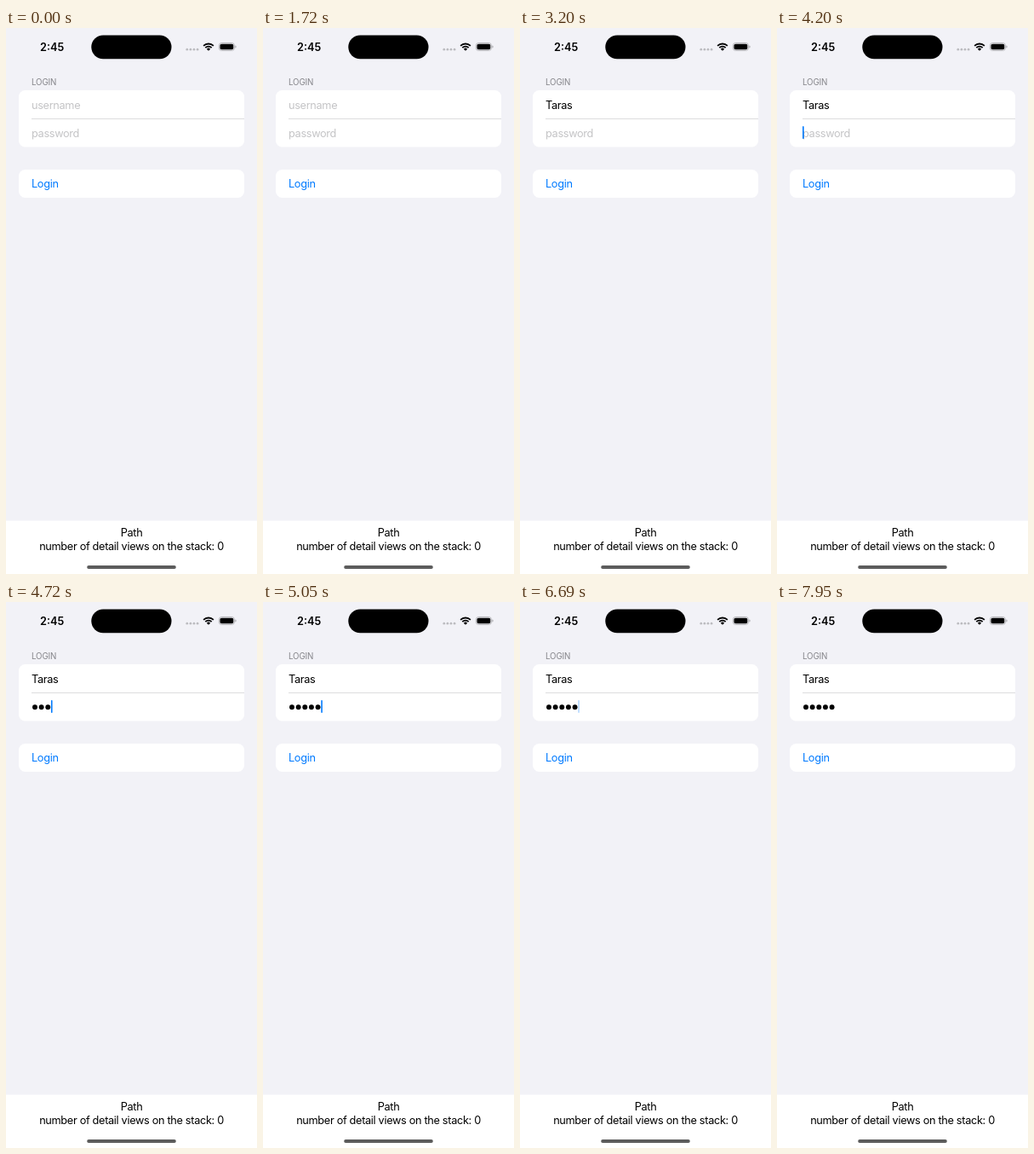
Animation, 295 px wide and 640 px high, one loop 8 s. Source, as an HTML page with a canvas:

```html
<!DOCTYPE html>
<html lang="en">
<head>
<meta charset="utf-8">
<title>Login form</title>
<style>
  html, body { margin: 0; width: 100%; height: 100%; overflow: hidden; background: #f2f2f7; }
  canvas { display: block; width: 295px; height: 640px; }
</style>
</head>
<body>
<canvas id="stage"></canvas>
<script>
const W = 295, H = 640, LOOP = 8000;
const BLUE = '#007aff', HINT = '#c4c4c6', LEFT = 30;
const NAME = 'Taras', BULLET = 7.65;

const canvas = document.getElementById('stage');
const ctx = canvas.getContext('2d');
const ratio = window.devicePixelRatio || 1;
canvas.width = W * ratio;
canvas.height = H * ratio;
ctx.scale(ratio, ratio);

// Each step: [start time, value], held until the next one.
const nameKeys = [[0, 0], [1830, 1], [2120, 2], [2260, 3], [2440, 5]];
const passKeys = [[0, 0], [4420, 1], [4720, 3], [4850, 4], [5050, 5]];
const nameCaret = [[0, 0], [1370, .7], [1480, .3], [1720, 0], [1830, 1],
  [2940, .65], [3060, .3], [3200, 0]];
const passCaret = [[0, 0], [3730, .7], [3870, .3], [4080, 0], [4200, 1],
  [5550, .65], [5670, .3], [5920, 0], [6030, 1],
  [6570, .65], [6690, .3], [6930, 0], [7050, 1],
  [7590, .65], [7710, .3], [7950, 0]];

function valueAt(steps, t) {
  let value = steps[0][1];
  for (const [start, v] of steps) if (t >= start) value = v;
  return value;
}

function pill(x, y, w, h, r, color) {
  ctx.fillStyle = color;
  ctx.beginPath();
  ctx.roundRect(x, y, w, h, r);
  ctx.fill();
}

function dot(x, y, r, color) {
  ctx.fillStyle = color;
  ctx.beginPath();
  ctx.arc(x, y, r, 0, 2 * Math.PI);
  ctx.fill();
}

function setFont(size = 12.75, tracking = -.34, weight = 400) {
  ctx.font = `${weight} ${size}px Inter, sans-serif`;
  ctx.letterSpacing = tracking + 'px';
}

function label(text, x, y, color = '#000') {
  ctx.fillStyle = color;
  ctx.fillText(text, x, y);
}

function centered(text, y) {
  label(text, W / 2 - ctx.measureText(text).width / 2, y);
}

function caret(x, y, alpha) {
  ctx.globalAlpha = alpha;
  pill(x, y, 1.6, 15, .8, BLUE);
  ctx.globalAlpha = 1;
}

function wifi(x, y) {
  const from = -Math.PI * .75, to = -Math.PI * .25;
  ctx.strokeStyle = ctx.fillStyle = '#000';
  ctx.lineWidth = 1.8;
  for (const r of [5.2, 8.3]) {
    ctx.beginPath();
    ctx.arc(x, y, r, from, to);
    ctx.stroke();
  }
  ctx.beginPath();
  ctx.moveTo(x, y);
  ctx.arc(x, y, 3, from, to);
  ctx.fill();
}

function battery(x, y) {
  ctx.strokeStyle = '#a4a4a8';
  ctx.lineWidth = .8;
  ctx.beginPath();
  ctx.roundRect(x + .4, y + .4, 18, 8.8, 2.9);
  ctx.stroke();
  pill(x + 1.5, y + 1.5, 15.8, 6.6, 1.8, '#000');
  pill(x + 19.4, y + 3.3, 1.1, 3, [0, 1, 1, 0], '#a4a4a8');
}

function statusBar() {
  setFont(12.7, 0, 600);
  label('2:45', 40, 26.5);
  pill(100.3, 8.4, 94.2, 27.8, 13.9, '#000');
  for (let i = 0; i < 4; i++) dot(212.8 + i * 4.1, 25.2, 1.35, '#bcbcc0');
  wifi(238, 26.8);
  battery(250, 17.2);
}

function form(t) {
  setFont(9.75, -.15);
  label('LOGIN', LEFT, 66.5, '#85858a');
  pill(15, 73, 265, 66.5, 7.5, '#fff');
  pill(15, 166, 265, 33, 7.5, '#fff');
  ctx.fillStyle = '#dcdcde';
  ctx.fillRect(LEFT, 106, 250, 1);

  setFont();
  const typed = NAME.slice(0, valueAt(nameKeys, t));
  label(typed || 'username', LEFT, 94.6, typed ? '#000' : HINT);
  caret(LEFT + ctx.measureText(typed).width, 81.7, valueAt(nameCaret, t));

  const count = valueAt(passKeys, t);
  if (!count) label('password', LEFT, 127.8, HINT);
  for (let i = 0; i < count; i++) dot(LEFT + (i + .52) * BULLET, 123.3, 2.95, '#000');
  caret(LEFT + count * BULLET, 115, valueAt(passCaret, t));

  label('Login', LEFT, 187.2, BLUE);
}

function footer() {
  ctx.fillStyle = '#fff';
  ctx.fillRect(0, 577.5, W, H - 577.5);
  setFont();
  centered('Path', 596.3);
  centered('number of detail views on the stack: 0', 611.6);
  pill(95.2, 630.1, 104.6, 3.8, 1.9, '#5c5c5c');
}

function draw(t) {
  ctx.fillStyle = '#f2f2f7';
  ctx.fillRect(0, 0, W, H);
  statusBar();
  form(t);
  footer();
}

const begin = performance.now();
function tick() {
  draw((performance.now() - begin) % LOOP);
  requestAnimationFrame(tick);
}
tick();
</script>
</body>
</html>
```
